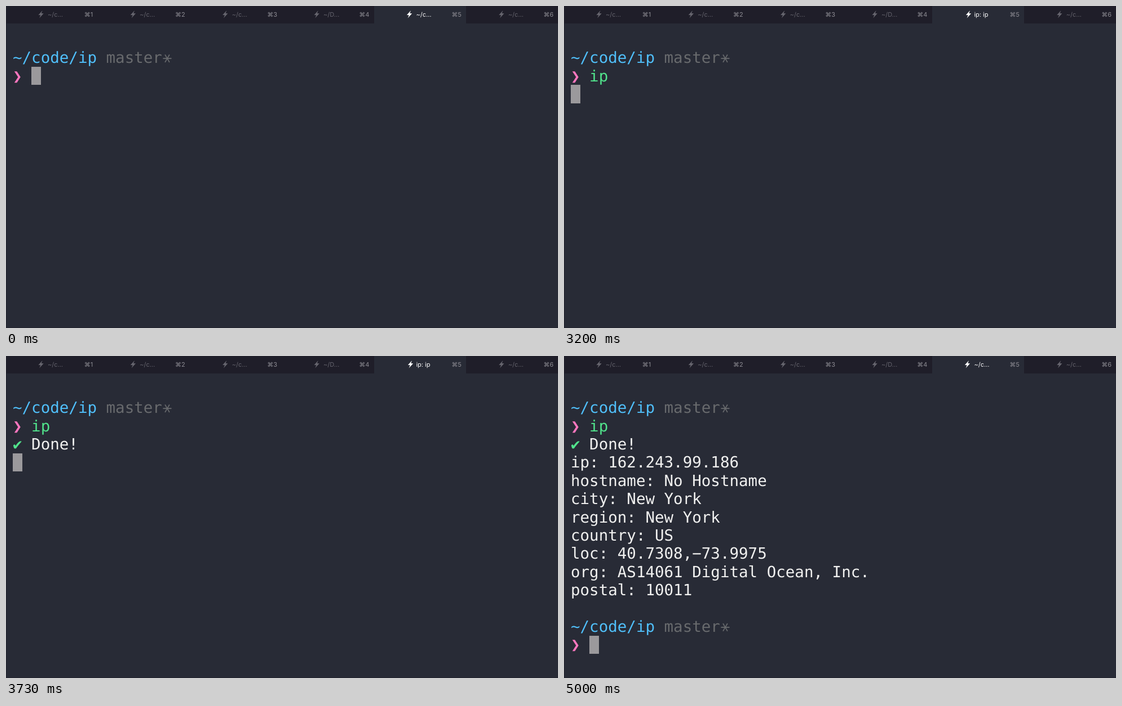
Recreate the animation shown at these times as an HTML page. Size 979 by 572 pixels, loop 8.59 s.

```html
<!DOCTYPE html>
<html lang="en">
<head>
<meta charset="utf-8">
<title>Terminal session</title>
<style>
html, body { margin: 0; width: 100%; height: 100%; overflow: hidden; background: #282b36; }
svg { display: block; width: 979px; height: 572px; }
text { white-space: pre; text-rendering: geometricPrecision; }
#tabs text { font: 11px Inter, "DejaVu Sans", sans-serif; }
#term text { font: 27.5px "DejaVu Sans Mono", "DejaVu Sans", monospace; }
#term text.bold { font-weight: bold; }
</style>
</head>
<body>
<svg viewBox="0 0 979 572">
  <rect width="979" height="572" fill="#282b36"/>
  <g id="tabs"></g>
  <g id="term"></g>
  <path d="M.5 0V571.5H979" fill="none" stroke="#22242f"/>
</svg>
<script>
const LOOP = 8590;
const CELL = 16.555, ROW = 32.4, LEFT = 12, TOP = 75.6, TAB = 163.35;
const C = { blue: '#50c0fb', gray: '#686a6d', pink: '#ff77bf', green: '#51e48c',
            red: '#ff6857', white: '#f1f1f0', cyan: '#93d9f2', block: '#9b999c' };
const INFO = ['ip: 162.243.99.186', 'hostname: No Hostname', 'city: New York',
  'region: New York', 'country: US', 'loc: 40.7308,\u221273.9975',
  'org: AS14061 Digital Ocean, Inc.', 'postal: 10011'];
const tabs = document.getElementById('tabs');
const term = document.getElementById('term');

const colX = c => LEFT + c * CELL;
const rowY = r => TOP + r * ROW;

function write(col, row, str, fill, cls = '') {
  return `<text class="${cls}" x="${colX(col)}" y="${rowY(row) + 25.6}" fill="${fill}">${str}</text>`;
}

function cursor(col, row) {
  const x = Math.round(colX(col)), y = Math.round(rowY(row));
  const w = Math.round(colX(col + 1)) - x, h = Math.round(rowY(row + 1)) - y;
  return `<rect x="${x}" y="${y}" width="${w}" height="${h}" fill="${C.block}"/>`;
}

// The star lies on its side, with one level arm.
function branch(row) {
  return write(10, row, 'master', C.gray) +
    `<g transform="translate(${colX(16.5)} ${rowY(row) + 17.6}) rotate(90)">` +
    `<text y="16.2" style="font-size:33px" text-anchor="middle" fill="${C.gray}">*</text></g>`;
}

function prompt(row, git = true) {
  return write(0, row, '~/code/ip', C.blue) + (git ? branch(row) : '') +
    write(0, row + 1, '❯', C.pink);
}

function spinner(row, dots) {
  return dots.map(([c, r]) =>
    `<circle cx="${17.6 + c * 6.6}" cy="${rowY(row) + 9.2 + r * 6.6}" r="1.75" fill="${C.cyan}"/>`).join('');
}

function drawTabs(running) {
  let out = '<rect width="979" height="31" fill="#1f1e29"/>';
  for (let i = 0; i < 6; i++) {
    const x = i * TAB, on = i === 4, busy = on && running;
    const ink = on ? '#ffffff' : '#66656e';
    const name = busy ? 'ip: ip' : i === 3 ? '~/D…' : '~/c…';
    const shift = busy ? 2 : i === 3 ? -1 : 0;
    if (on) out += '<rect x="653" width="163" height="31" fill="#282b36"/>';
    out += `<path transform="translate(${x + 62 + shift} 14.7)" fill="${ink}"
      d="M2.6-6.8-4.6 1.2-.7 1.5-2.8 6.7 4.7-1.4.8-1.7Z"/>`;
    out += `<text x="${x + 74 + Math.min(shift, 0)}" y="18.7" fill="${ink}">${name}</text>`;
    out += `<text x="${x + 154.3}" y="18.7" text-anchor="end" fill="#8d8c93">⌘${i + 1}</text>`;
  }
  return out;
}

function drawTerm(t) {
  let out = prompt(0);
  if (t < 2000) return out + cursor(2, 1);
  if (t < 2530) return out + write(2, 1, 'i', C.red, 'bold') + cursor(3, 1);
  out += write(2, 1, 'ip', C.green);
  if (t < 3200) return out + cursor(4, 1);
  if (t < 3530) return out + cursor(0, 2);
  if (t < 3730) {
    const last = t < 3670 ? [0, 1] : [1, 1];
    return out + spinner(2, [[0, 0], [1, 0], last]) + write(2, 2, 'Getting ip info...', C.white);
  }
  out += write(0, 2, '✔', C.green) + write(2, 2, 'Done!', C.white);
  if (t < 4330) return out + cursor(0, 3);
  out += INFO.map((line, i) => write(0, 3 + i, line, C.white)).join('');
  if (t < 4470) return out + cursor(0, 3);
  if (t < 4600) return out + cursor(0, 11);
  return out + prompt(12, t >= 4670) + cursor(2, 13);
}

let shownTabs = '', shownTerm = '';
function render(t) {
  const bar = drawTabs(t >= 3200 && t < 4600), body = drawTerm(t);
  if (bar !== shownTabs) tabs.innerHTML = shownTabs = bar;
  if (body !== shownTerm) term.innerHTML = shownTerm = body;
}

const start = performance.now();
function tick() {
  render((performance.now() - start) % LOOP);
  requestAnimationFrame(tick);
}
tick();
</script>
</body>
</html>
```
